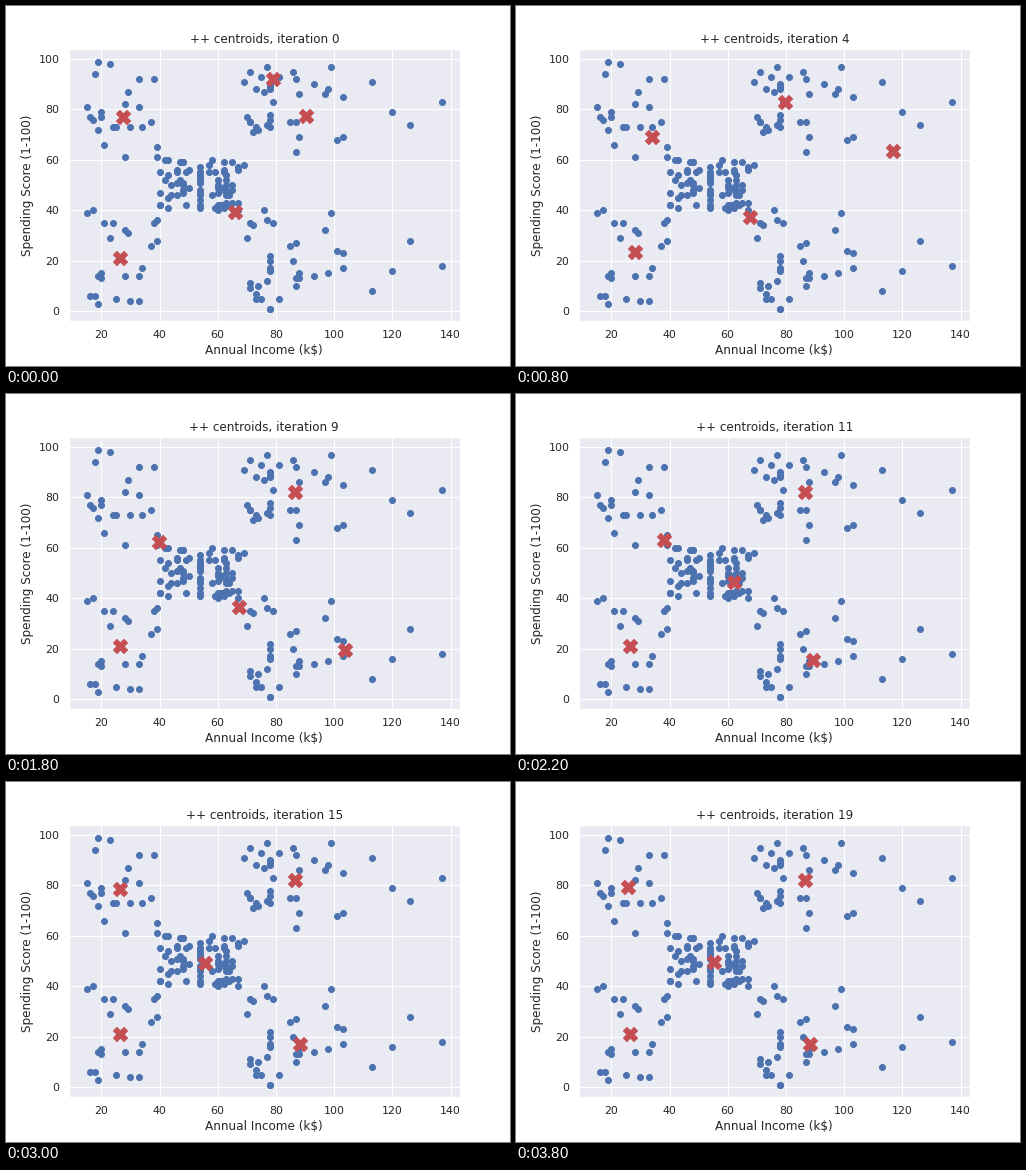
A matplotlib script for the animation above (4 s loop, 504 by 360 pixels).

```python
import numpy as np
import matplotlib.pyplot as plt
from matplotlib.animation import FuncAnimation

W, H, DPI = 504, 360, 72
STEPS, LOOP_MS = 20, 4000
BLUE, RED, PANEL, INK = "#4c72b0", "#c44e52", "#eaeaf2", "#262626"

# Spending scores of the customers at each annual income
LOW_INCOME = {
    15: (39, 81), 16: (6, 77), 17: (40, 76), 18: (6, 94),
    19: (3, 72, 14, 99), 20: (15, 77, 13, 79), 21: (35, 66),
    23: (29, 98), 24: (35, 73), 25: (5, 73), 28: (14, 82, 32, 61),
    29: (31, 87), 30: (4, 73), 33: (4, 92, 14, 81), 34: (17, 73),
    37: (26, 75), 38: (35, 92), 39: (36, 61, 28, 65),
}
MID_INCOME = {
    40: (55, 47, 42, 42), 42: (52, 60), 43: (54, 60, 45, 41),
    44: (50, 46), 46: (51, 46, 56, 55), 47: (52, 59),
    48: (51, 59, 50, 48, 59, 47), 49: (55, 42), 50: (49, 56),
    54: (47, 54, 53, 48, 52, 42, 51, 55, 41, 44, 57, 46),
    57: (58, 55), 58: (60, 46), 59: (55, 41),
    60: (49, 40, 42, 52, 47, 50), 61: (42, 49),
    62: (41, 48, 59, 55, 56, 42), 63: (50, 46, 43, 48, 52, 54),
    64: (42, 46), 65: (48, 50, 43, 59), 67: (43, 57, 56, 40),
}
HIGH_INCOME = {
    69: (58, 91), 70: (29, 77), 71: (35, 95, 11, 75, 9, 75), 72: (34, 71),
    73: (5, 88, 7, 73), 74: (10, 72), 75: (5, 93), 76: (40, 87),
    77: (12, 97, 36, 74),
    78: (22, 90, 17, 88, 20, 76, 16, 89, 1, 78, 1, 73),
    79: (35, 83), 81: (5, 93), 85: (26, 75), 86: (20, 95),
    87: (27, 63, 13, 75, 10, 92), 88: (13, 86, 15, 69), 93: (14, 90),
    97: (32, 86), 98: (15, 88), 99: (39, 97), 101: (24, 68),
    103: (17, 85, 23, 69), 113: (8, 91), 120: (16, 79), 126: (28, 74),
    137: (18, 83),
}
START = [(27.48, 76.88), (26.304, 20.913), (65.885, 39.239),
         (79.077, 91.923), (90.269, 77.231)]

points = np.array([(income, score)
                   for band in (LOW_INCOME, MID_INCOME, HIGH_INCOME)
                   for income, scores in band.items()
                   for score in scores], float)


def lloyd_step(centroids):
    """Move every centroid to the mean of its nearest points."""
    dist = ((points[:, None] - centroids) ** 2).sum(axis=2)
    nearest = dist.argmin(axis=1)
    return np.array([points[nearest == k].mean(axis=0)
                     for k in range(len(centroids))])


path = [np.array(START)]
while len(path) < STEPS:
    path.append(lloyd_step(path[-1]))


def padded(values, margin=0.05):
    lo, hi = values.min(), values.max()
    pad = margin * (hi - lo)
    return lo - pad, hi + pad


plt.rcParams.update({"font.family": "DejaVu Sans", "text.color": INK,
                     "axes.labelcolor": INK})
fig = plt.figure(figsize=(W / DPI, H / DPI), dpi=DPI, facecolor="white")
fig.subplots_adjust(left=0.125, right=0.9, bottom=0.125, top=0.88)
ax = fig.add_subplot(facecolor=PANEL)
ax.set_axisbelow(True)
ax.grid(color="white", linewidth=1, solid_capstyle="round")
for spine in ax.spines.values():
    spine.set(color="white", linewidth=1.25)
ax.tick_params(length=0, pad=9.5, labelsize=11, labelcolor=INK)
ax.set(xlim=padded(points[:, 0]), ylim=padded(points[:, 1]),
       xticks=range(20, 141, 20), yticks=range(0, 101, 20))
ax.set_xlabel("Annual Income (k$)", fontsize=12)
ax.set_ylabel("Spending Score (1-100)", fontsize=12)
title = ax.set_title("", fontsize=12, pad=6)

ax.scatter(*points.T, s=36, color=BLUE, linewidths=1, zorder=2)
marks = ax.scatter(*path[0].T, s=200, marker="X", color=RED,
                   linewidths=1, zorder=3)


def draw(i):
    marks.set_offsets(path[i])
    title.set_text(f"++ centroids, iteration {i}")
    return marks, title


anim = FuncAnimation(fig, draw, frames=STEPS, interval=LOOP_MS / STEPS,
                     repeat=True, repeat_delay=0, blit=False)
plt.show()
```
